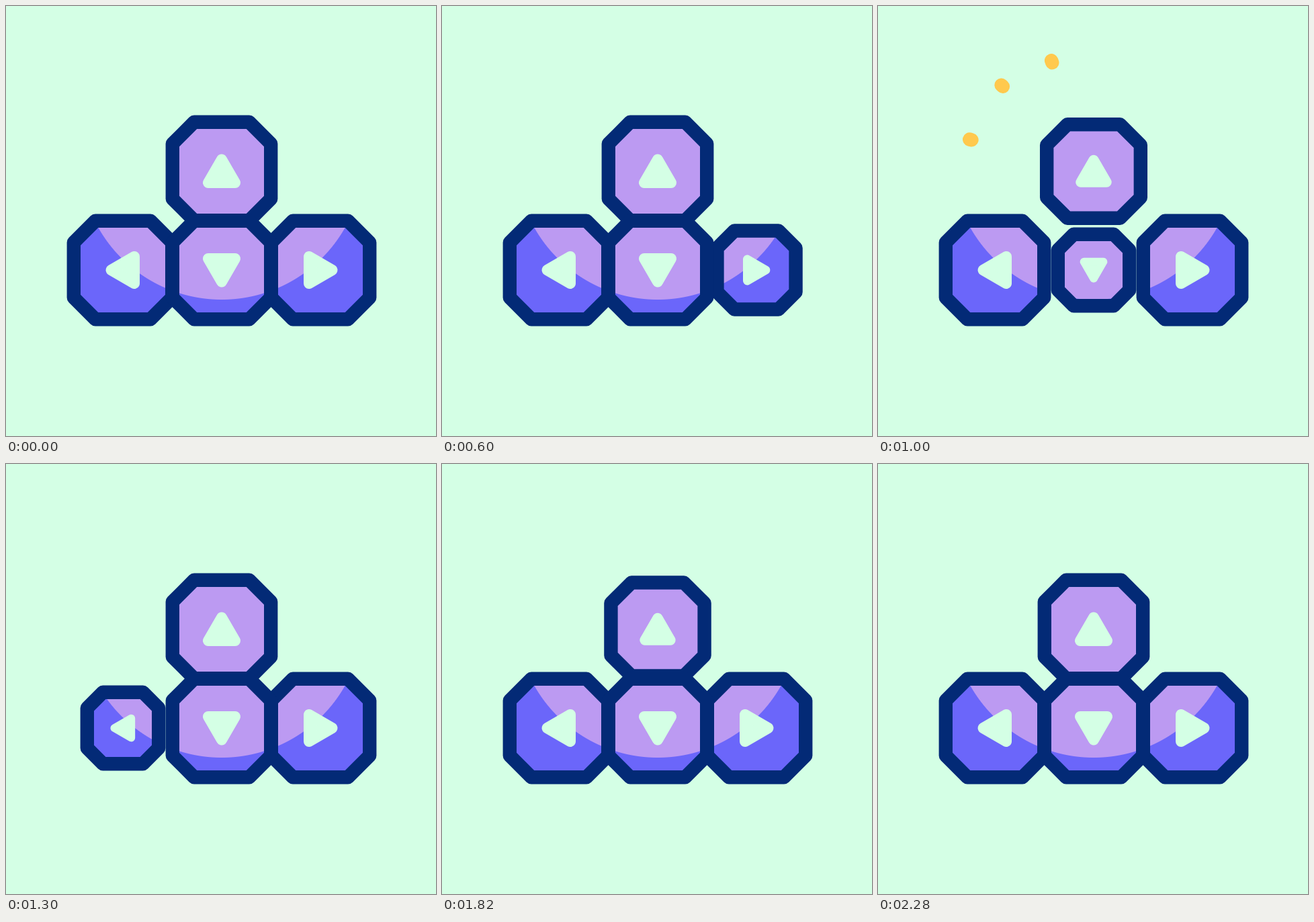
These frames come from a looping animation (640 by 640 pixels, 2.4 s). An HTML page:

```html
<!DOCTYPE html>
<html lang="en">
<head>
<meta charset="utf-8">
<title>Arrow keys</title>
<style>
  html, body { margin: 0; width: 100%; height: 100%; overflow: hidden; background: #d4ffe5; }
  svg { display: block; width: 100vw; height: 100vh; }
</style>
</head>
<body>
<svg id="stage" viewBox="0 0 640 640">
  <defs>
    <radialGradient id="shine" gradientUnits="userSpaceOnUse" cx="321" cy="226" r="211.5">
      <stop offset=".9953" stop-color="#bc9af2"/>
      <stop offset="1" stop-color="#6b66fa"/>
    </radialGradient>
  </defs>
  <g id="rays" stroke="#ffc94d" stroke-width="20.4" stroke-linecap="round"/>
  <g id="keys"/>
</svg>
<script>
const LOOP = 2400;
const LEG = 180;       // time for one half of a press
const DEPTH = 0.273;   // scale lost at the bottom of a press
const HALF = 73.2, EDGE = 41;

const KEYS = [
  { x: 174, y: 393, turn: -90, presses: [0, 1120] },
  { x: 468, y: 393, turn: 90, presses: [360, 1460] },
  { x: 321, y: 246, turn: 0, presses: [688, 1772] },
  { x: 321, y: 393, turn: 180, presses: [820, 1920] }
];

// Outer ends of the burst, drawn along lines from the top key's centre
const TIPS = [[136.2, 198.5], [183.5, 117.6], [258.1, 81.2]];
const RAY = 48;

const clamp = v => Math.max(0, Math.min(1, v));
const smooth = v => { v = clamp(v); return v * v * (3 - 2 * v); };

function add(parent, tag, attrs) {
  const el = document.createElementNS("http://www.w3.org/2000/svg", tag);
  set(el, attrs);
  parent.appendChild(el);
  return el;
}

function set(el, attrs) {
  for (const name in attrs) el.setAttribute(name, attrs[name]);
}

function octagon(cx, cy, s) {
  const h = HALF * s, e = EDGE * s;
  return [[-e, -h], [e, -h], [h, -e], [h, e], [e, h], [-e, h], [-h, e], [-h, -e]]
    .map(([x, y]) => `${(cx + x).toFixed(3)},${(cy + y).toFixed(3)}`)
    .join(" ");
}

const keyLayer = document.getElementById("keys");
const rayLayer = document.getElementById("rays");

for (const key of KEYS) {
  key.cap = add(keyLayer, "polygon", {
    fill: "url(#shine)", stroke: "#032a76", "stroke-width": 20.4, "stroke-linejoin": "round"
  });
  key.arrow = add(keyLayer, "path", {
    d: "M-20 17H20L0 -17.5Z", fill: "#d4ffe5", stroke: "#d4ffe5",
    "stroke-width": 16, "stroke-linejoin": "round"
  });
}

const rays = TIPS.map(([x, y]) => {
  const dx = x - 321, dy = y - 246, len = Math.hypot(dx, dy);
  return { x, y, ux: dx / len, uy: dy / len, el: add(rayLayer, "line", {}) };
});

function pressScale(key, t) {
  const depth = key.presses.reduce(
    (sum, start) => sum + smooth(1 - Math.abs(t - start - LEG) / LEG), 0);
  return 1 - DEPTH * depth;
}

function drawRays(t) {
  const visible = t >= 790 && t < 1040;
  rayLayer.setAttribute("visibility", visible ? "visible" : "hidden");
  if (!visible) return;
  const head = RAY * (1 - smooth((t - 790) / 120));
  const tail = RAY * (1 - smooth((t - 850) / 180));
  const width = 20.4 * clamp((1040 - t) / 30) * clamp((t - 780) / 30);
  rayLayer.setAttribute("stroke-width", width);
  for (const r of rays) {
    set(r.el, {
      x1: r.x - r.ux * tail, y1: r.y - r.uy * tail,
      x2: r.x - r.ux * head, y2: r.y - r.uy * head
    });
  }
}

function draw(t) {
  for (const key of KEYS) {
    const s = pressScale(key, t);
    key.cap.setAttribute("points", octagon(key.x, key.y, s));
    key.arrow.setAttribute("transform",
      `translate(${key.x} ${key.y}) rotate(${key.turn}) scale(${s})`);
  }
  drawRays(t);
}

const began = performance.now();
function tick() {
  draw((performance.now() - began) % LOOP);
  requestAnimationFrame(tick);
}
draw(0);
requestAnimationFrame(tick);
</script>
</body>
</html>
```
